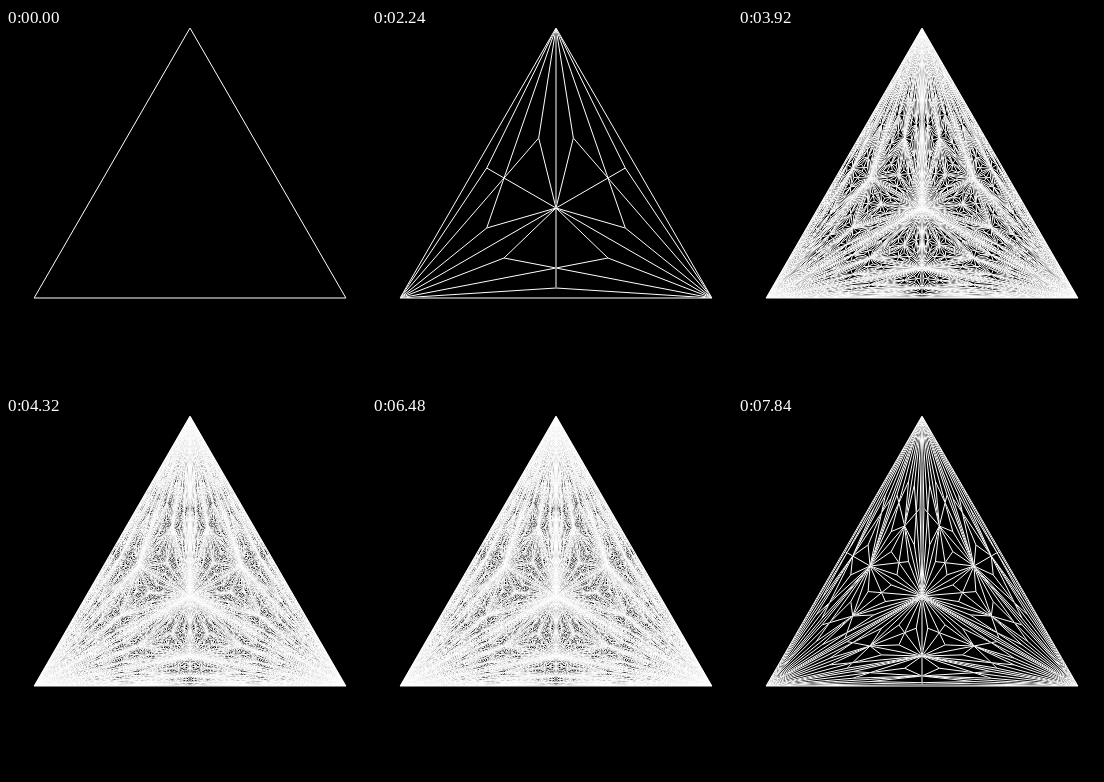
Write an HTML page with a canvas that moves like this. It is 360 px wide and 360 px high and loops after 8 s.

```html
<!DOCTYPE html>
<html>
<head>
<meta charset="utf-8">
<title>Centroid subdivision</title>
<style>
html, body { margin: 0; width: 100%; height: 100%; overflow: hidden; background: #000; }
canvas { display: block; }
</style>
</head>
<body>
<canvas id="stage" width="360" height="360"></canvas>
<script>
const SIZE = 360, LOOP = 8000, MAX_DEPTH = 9;
const CENTER_X = 184, HEIGHT = 270, HALF_BASE = HEIGHT / Math.sqrt(3);
const CORNERS = [[CENTER_X, 0], [CENTER_X - HALF_BASE, HEIGHT], [CENTER_X + HALF_BASE, HEIGHT]];

// [start time in ms, subdivision depth]
const SCHEDULE = [
  [0, 0], [1440, 1], [1840, 2], [2240, 3], [2720, 4], [3040, 5], [3520, 6],
  [3920, 7], [4240, 8], [4800, 9], [6480, 8], [6960, 7], [7440, 6], [7840, 5]
];

const gray = new Uint8Array(SIZE * SIZE);

// Overlapping lines keep the brightest value instead of adding up.
function plot(x, y, coverage) {
  if (x < 0 || y < 0 || x >= SIZE || y >= SIZE) return;
  const i = y * SIZE + x;
  gray[i] = Math.max(gray[i], Math.round(coverage * 255));
}

// Antialiased line: each step along the main axis shades the two nearest pixels.
function line(p, q) {
  const main = Math.abs(q[0] - p[0]) > Math.abs(q[1] - p[1]) ? 0 : 1;
  const side = 1 - main;
  const [a, b] = p[main] < q[main] ? [p, q] : [q, p];
  const slope = (b[side] - a[side]) / (b[main] - a[main]);
  for (let m = Math.ceil(a[main] - 0.5); m + 0.5 <= b[main]; m++) {
    const s = a[side] + slope * (m + 0.5 - a[main]) - 0.5;
    const near = Math.floor(s), part = s - near;
    for (const [n, coverage] of [[near, 1 - part], [near + 1, part]]) {
      if (main === 0) plot(m, n, coverage);
      else plot(n, m, coverage);
    }
  }
}

function snapshot() {
  const image = new ImageData(SIZE, SIZE);
  gray.forEach((v, i) => image.data.set([v, v, v, 255], i * 4));
  return image;
}

// Each layer adds the spokes from every triangle's centroid to its corners.
function buildLayers() {
  const [a, b, c] = CORNERS;
  [[a, b], [b, c], [c, a]].forEach(([p, q]) => line(p, q));
  const layers = [snapshot()];
  let triangles = [CORNERS];
  for (let depth = 1; depth <= MAX_DEPTH; depth++) {
    triangles = triangles.flatMap(([a, b, c]) => {
      const m = [0, 1].map(i => (a[i] + b[i] + c[i]) / 3);
      [a, b, c].forEach(p => line(m, p));
      return [[a, b, m], [b, c, m], [c, a, m]];
    });
    layers.push(snapshot());
  }
  return layers;
}

const layers = buildLayers();
const stage = document.getElementById('stage').getContext('2d');
const start = performance.now();

function draw() {
  const t = (performance.now() - start) % LOOP;
  const [, depth] = SCHEDULE.findLast(([from]) => t >= from);
  stage.putImageData(layers[depth], 0, 0);
  requestAnimationFrame(draw);
}
draw();
</script>
</body>
</html>
```
